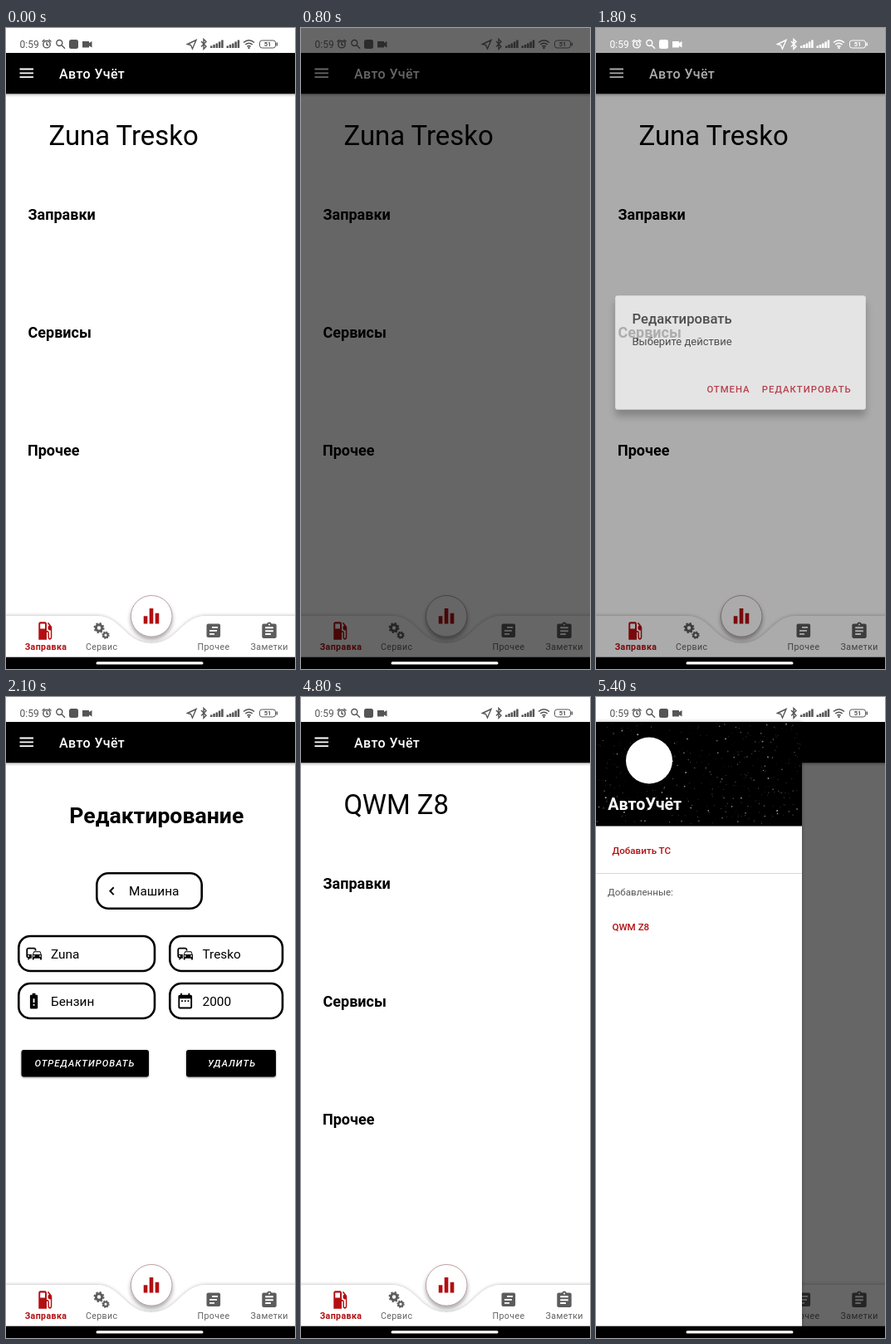
An HTML page for the animation above (7.3 s loop, 348x772 px).

```html
<!DOCTYPE html>
<html lang="ru">
<head>
<meta charset="utf-8">
<style>
html, body { margin: 0; width: 100%; height: 100%; overflow: hidden; background: #fff; }
svg { display: block; width: 348px; height: 772px; font-family: Roboto, sans-serif; }
.b { font-weight: 700; }
.m { font-weight: 500; }
.mid { text-anchor: middle; }
.h { font-size: 18px; font-weight: 700; }
.tab { font-size: 10.6px; letter-spacing: .4px; text-anchor: middle; fill: #626262; }
.btn { font-size: 11.3px; font-weight: 500; letter-spacing: 1px; }
.field { font-size: 15.4px; }
.box rect { fill: #fff; stroke: #000; stroke-width: 2.6; }
.red { fill: #b30f12; }
.line { fill: none; stroke: currentColor; stroke-width: 1.4; }
</style>
</head>
<body>
<svg viewBox="0 0 348 772">
  <defs>
    <linearGradient id="fade" x2="0" y2="1">
      <stop stop-opacity=".2"/><stop offset="1" stop-opacity="0"/>
    </linearGradient>
    <radialGradient id="glow" gradientUnits="userSpaceOnUse" cx="285" cy="441" r="42">
      <stop stop-color="#484848"/><stop offset=".6" stop-color="#363636"/><stop offset="1" stop-color="#000"/>
    </radialGradient>
    <filter id="soft" x="-20%" y="-30%" width="140%" height="160%">
      <feDropShadow dx="0" dy="0" stdDeviation="2.2" flood-opacity=".3"/>
    </filter>
    <filter id="lift" x="-20%" y="-30%" width="140%" height="160%">
      <feDropShadow dx="0" dy="1" stdDeviation="1.2" flood-opacity=".4"/>
    </filter>
    <filter id="float" x="-30%" y="-30%" width="160%" height="170%">
      <feDropShadow dx="0" dy="3.500" stdDeviation="2.800" flood-opacity=".35"/>
    </filter>
    <filter id="high" x="-20%" y="-30%" width="140%" height="170%">
      <feDropShadow dx="0" dy="8" stdDeviation="5" flood-opacity=".35"/>
    </filter>
    <path id="commute" d="M12 4H5C3.34 4 2 5.34 2 7v8c0 1.66 1.34 3 3 3l-1 1v1h1l2-2.03L9 18v-5H4V5.98L13 6v2h2V7c0-1.66-1.34-3-3-3zM5 14c.55 0 1 .45 1 1s-.45 1-1 1-1-.45-1-1 .45-1 1-1zm15.57-4.34c-.14-.4-.52-.66-.97-.66h-7.19c-.46 0-.83.26-.98.66L10 13.77l.01 5.51c0 .38.31.72.69.72h.62c.38 0 .68-.38.68-.76V18h8v1.24c0 .38.31.76.69.76h.61c.38 0 .69-.34.69-.72l.01-1.37v-4.14l-1.43-4.11zm-8.16.34h7.19l1.03 3h-9.25l1.03-3zM12 16c-.55 0-1-.45-1-1s.45-1 1-1 1 .45 1 1-.45 1-1 1zm8 0c-.55 0-1-.45-1-1s.45-1 1-1 1 .45 1 1-.45 1-1 1z"/>
    <g id="gear" fill="none" stroke="#5c5c5c">
      <circle r="3.7" stroke-width="3"/>
      <circle r="5.6" stroke-width="1.8" stroke-dasharray="2.2"/>
    </g>
    <path id="signal" d="M0 24v-2.500h2.500v2.500zM3.300 24v-4h2.500v4zM6.600 24v-5.500h2.500v5.500zM9.900 24v-7.500h2.500v7.500zM13.200 24v-9.500h2.500v9.500z"/>
  </defs>

  <rect width="348" height="772" fill="#fff"/>

  <g id="home">
    <text id="car" x="51.5" y="141" font-size="32.9"></text>
    <text class="h" x="26.500" y="231">Заправки</text>
    <text class="h" x="26.500" y="373">Сервисы</text>
    <text class="h" x="26" y="514.500">Прочее</text>
  </g>

  <g id="edit">
    <text class="b mid" x="181.300" y="152" font-size="26.600">Редактирование</text>
    <g class="box">
      <rect x="109.300" y="212.300" width="126.400" height="42.400" rx="14"/>
      <rect x="15.300" y="288" width="163.700" height="42" rx="14"/>
      <rect x="197.300" y="288" width="135.700" height="42" rx="14"/>
      <rect x="15.300" y="345" width="163.700" height="42" rx="14"/>
      <rect x="197.300" y="345" width="135.700" height="42" rx="14"/>
    </g>
    <path d="M129.700 229.300l-4.300 4.400 4.300 4.400" fill="none" stroke="#000" stroke-width="2"/>
    <use href="#commute" transform="translate(22.500 298) scale(.93)"/>
    <use href="#commute" transform="translate(204.500 298) scale(.93)"/>
    <path transform="translate(22.400 355) scale(.93)" d="M15.670 4H14V2h-4v2H8.330C7.600 4 7 4.600 7 5.330v15.330C7 21.400 7.600 22 8.330 22h7.330c.74 0 1.340-.6 1.340-1.330V5.330C17 4.600 16.400 4 15.670 4zM13 18h-2v-2h2v2zm0-4h-2V9h2v5z"/>
    <path transform="translate(204.600 355) scale(.93)" d="M9 11H7v2h2v-2zm4 0h-2v2h2v-2zm4 0h-2v2h2v-2zm2-7h-1V2h-2v2H8V2H6v2H5c-1.110 0-1.990.9-1.990 2L3 20c0 1.100.89 2 2 2h14c1.100 0 2-.9 2-2V6c0-1.100-.9-2-2-2zm0 16H5V9h14v11z"/>
    <g class="field">
      <text x="148" y="239">Машина</text>
      <text x="54" y="315">Zuna</text>
      <text x="236.500" y="315">Tresko</text>
      <text x="54" y="372">Бензин</text>
      <text x="236.500" y="372">2000</text>
    </g>
    <rect x="18.500" y="425" width="153.500" height="32.500" rx="3" filter="url(#lift)"/>
    <rect id="del" x="217" y="425" width="108" height="32.500" rx="3" filter="url(#lift)"/>
    <g class="btn mid" font-style="italic" fill="#fff">
      <text x="95" y="445">ОТРЕДАКТИРОВАТЬ</text>
      <text x="272" y="445">УДАЛИТЬ</text>
    </g>
  </g>

  <g id="bottomBar">
    <path d="M-9 708H108C140 708 142 741 175 741S210 708 242 708H357V772H-9Z" fill="#fff" filter="url(#soft)"/>
    <circle cx="175.200" cy="708.300" r="24.800" fill="#fff" stroke="#a98a8c" stroke-width=".8" filter="url(#float)"/>
    <path class="red" transform="translate(161.100 694.300) scale(1.160)" d="M10 20h4V4h-4zM4 20h4v-8H4zM16 9v11h4V9z"/>
    <path class="red" transform="translate(35.400 711.600) scale(.970 1.200)" d="M19.770 7.230l.01-.01-3.720-3.720L15 4.560l2.110 2.110c-.94.36-1.610 1.260-1.610 2.330 0 1.380 1.120 2.500 2.500 2.500.36 0 .69-.08 1-.21v7.210c0 .55-.45 1-1 1s-1-.45-1-1V14c0-1.100-.9-2-2-2h-1V5c0-1.100-.9-2-2-2H6c-1.100 0-2 .9-2 2v16h10v-7.500h1.500v5c0 1.380 1.120 2.500 2.500 2.500s2.500-1.120 2.500-2.500V9c0-.69-.28-1.320-.73-1.770zM12 10H6V5h6v5z"/>
    <use href="#gear" transform="translate(112 722.500)"/>
    <use href="#gear" transform="translate(120 731.200) scale(.72)"/>
    <rect x="241.500" y="717.500" width="16.600" height="16.600" rx="2" fill="#5c5c5c"/>
    <path d="M248 721.800h7M245 725.800h9M245 729.800h6" stroke="#fff" stroke-width="1.700"/>
    <path fill="#5c5c5c" transform="translate(305.400 714.600) scale(.967)" d="M19 3h-4.180C14.400 1.840 13.300 1 12 1c-1.300 0-2.400.84-2.820 2H5c-1.100 0-2 .9-2 2v14c0 1.100.9 2 2 2h14c1.100 0 2-.9 2-2V5c0-1.100-.9-2-2-2zm-7 0c.55 0 1 .45 1 1s-.45 1-1 1-1-.45-1-1 .45-1 1-1zm2 14H7v-2h7v2zm3-4H7v-2h10v2zm0-4H7V7h10v2z"/>
    <text class="tab b" x="48" y="749" style="fill:#b30f12">Заправка</text>
    <text class="tab" x="115.200" y="749">Сервис</text>
    <text class="tab" x="250" y="749">Прочее</text>
    <text class="tab" x="317.200" y="749">Заметки</text>
  </g>

  <g id="toolbar">
    <rect y="30" width="348" height="49.300"/>
    <rect y="79.300" width="348" height="4" fill="url(#fade)"/>
    <path d="M16.500 49.500h16.500M16.500 54.300h16.500M16.500 59.200h16.500" stroke="#fff" stroke-width="1.800"/>
    <text class="m" x="64" y="61" font-size="16" letter-spacing=".4" fill="#fff">Авто Учёт</text>
  </g>

  <rect id="dim" width="348" height="758"/>

  <g id="dialog">
    <rect x="23.200" y="322.300" width="301.600" height="137.200" rx="3" fill="#fff" filter="url(#high)"/>
    <text class="m" x="43.500" y="356" font-size="16.600" fill="#222">Редактировать</text>
    <text x="43.500" y="381.500" font-size="13" fill="#222">Выберите действие</text>
    <g class="btn" fill="#c00d20">
      <text x="133.500" y="439">ОТМЕНА</text>
      <text x="199.800" y="439">РЕДАКТИРОВАТЬ</text>
    </g>
  </g>

  <g id="drawer">
    <rect y="30" width="248" height="728" fill="#fff" filter="url(#soft)"/>
    <rect y="30" width="248" height="125.500"/>
    <g id="dust" fill="#fff"></g>
    <circle cx="64" cy="76.500" r="28" fill="#fff"/>
    <text class="b" x="14.300" y="136" font-size="19.700" fill="#fff">АвтоУчёт</text>
    <path d="M0 212.500h248" stroke="#d8d8d8"/>
    <g font-size="11.600">
      <text class="m red" x="19.500" y="188.500">Добавить ТС</text>
      <text x="14" y="239" fill="#555">Добавленные:</text>
      <text class="m red" x="19.500" y="281">QWM Z8</text>
    </g>
  </g>

  <g id="status" fill="currentColor">
    <text x="16.500" y="24" font-size="12">0:59</text>
    <g class="line">
      <circle cx="49" cy="19.700" r="4.200"/>
      <path d="M49 17v3l2 1M43.500 16.500l3-2.500M54.500 16.500l-3-2.500"/>
      <circle cx="64.300" cy="18" r="3.500"/>
      <path d="M67 20.700l4 4"/>
      <path d="M218.500 19.500L229 14.500l-4.500 10.500-2-4.500z"/>
      <path d="M235 16l6 6.200-3 3V13.500l3 3-6 6"/>
      <path d="M286 17.500q6.500-5.500 13 0M288.200 20q4.300-3.500 8.600 0M290.400 22.300q2.100-1.600 4.200 0" stroke-width="1.600"/>
      <rect x="305.500" y="15" width="19" height="9" rx="2.800" stroke-width="1"/>
    </g>
    <rect x="76" y="14" width="11" height="11" rx="2.500"/>
    <path d="M92 16h8v2l3.500-2v7.500l-3.500-2v2h-8z"/>
    <use href="#signal" x="246"/>
    <use href="#signal" x="265.500"/>
    <circle cx="292.500" cy="24" r="1.200"/>
    <rect x="325.500" y="17.500" width="1.500" height="4"/>
    <text class="b mid" x="315" y="22.300" font-size="7.500">51</text>
  </g>

  <rect y="757.700" width="348" height="14.300"/>
  <rect x="108.500" y="763.300" width="129" height="3.200" rx="1.600" fill="#fff"/>
</svg>
<script>
const LOOP = 7300, STEP = 100;
const $ = id => document.getElementById(id);
const clamp = v => Math.max(0, Math.min(1, v));
const show = (id, alpha) => $(id).setAttribute('opacity', alpha);

// Speckled drawer header
let seed = 7;
const rnd = () => (seed = seed * 16807 % 2147483647) / 2147483647;
let dots = '';
for (let i = 0; i < 420; i++) {
  const x = rnd() * 247, y = 31 + rnd() * 123;
  dots += `<circle cx="${x}" cy="${y}" r="${.35 + rnd() ** 4 * .7}" opacity="${.15 + rnd() * .5}"/>`;
}
$('dust').innerHTML = dots;

function dialogState(t) {
  if (t < 800 || t >= 2000) return { dim: 0, alpha: 0 };
  if (t < 1800) return { dim: .6, alpha: clamp((t - 800) / 250) };
  const out = t - 1800;
  return { dim: .33 - .0022 * out, alpha: .68 - .0043 * out };
}

function statusColor(t) {
  if (t < 800 || t >= 2000) return '#555';
  return t < 1000 ? '#2c2c2c' : '#fff';
}

function draw(t) {
  const { dim, alpha } = dialogState(t);
  const edit = t < 3800 ? clamp((t - 1850) / 220) : 0;
  const open = 1 - (1 - clamp((t - 5050) / 350)) ** 3;
  const size = t < 1100 ? .9 + .1 * alpha : 1;

  $('car').textContent = t < 3800 ? 'Zuna Tresko' : 'QWM Z8';
  show('home', 1 - edit);
  show('edit', edit);
  show('dim', Math.max(dim, .6 * open));
  $('dim').setAttribute('y', open > 0 ? 30 : 0); // the drawer leaves the status bar bright
  show('dialog', alpha);
  $('dialog').setAttribute('transform', `translate(174 391) scale(${size}) translate(-174 -391)`);
  $('del').setAttribute('fill', t >= 3700 ? 'url(#glow)' : '#000');
  show('drawer', open > 0 ? 1 : 0);
  $('drawer').setAttribute('transform', `translate(${248 * (open - 1)})`);
  $('status').style.color = statusColor(t);
}

const start = performance.now();
function tick() {
  const t = (performance.now() - start) % LOOP;
  draw(Math.floor(t / STEP) * STEP);
  requestAnimationFrame(tick);
}
tick();
</script>
</body>
</html>
```
